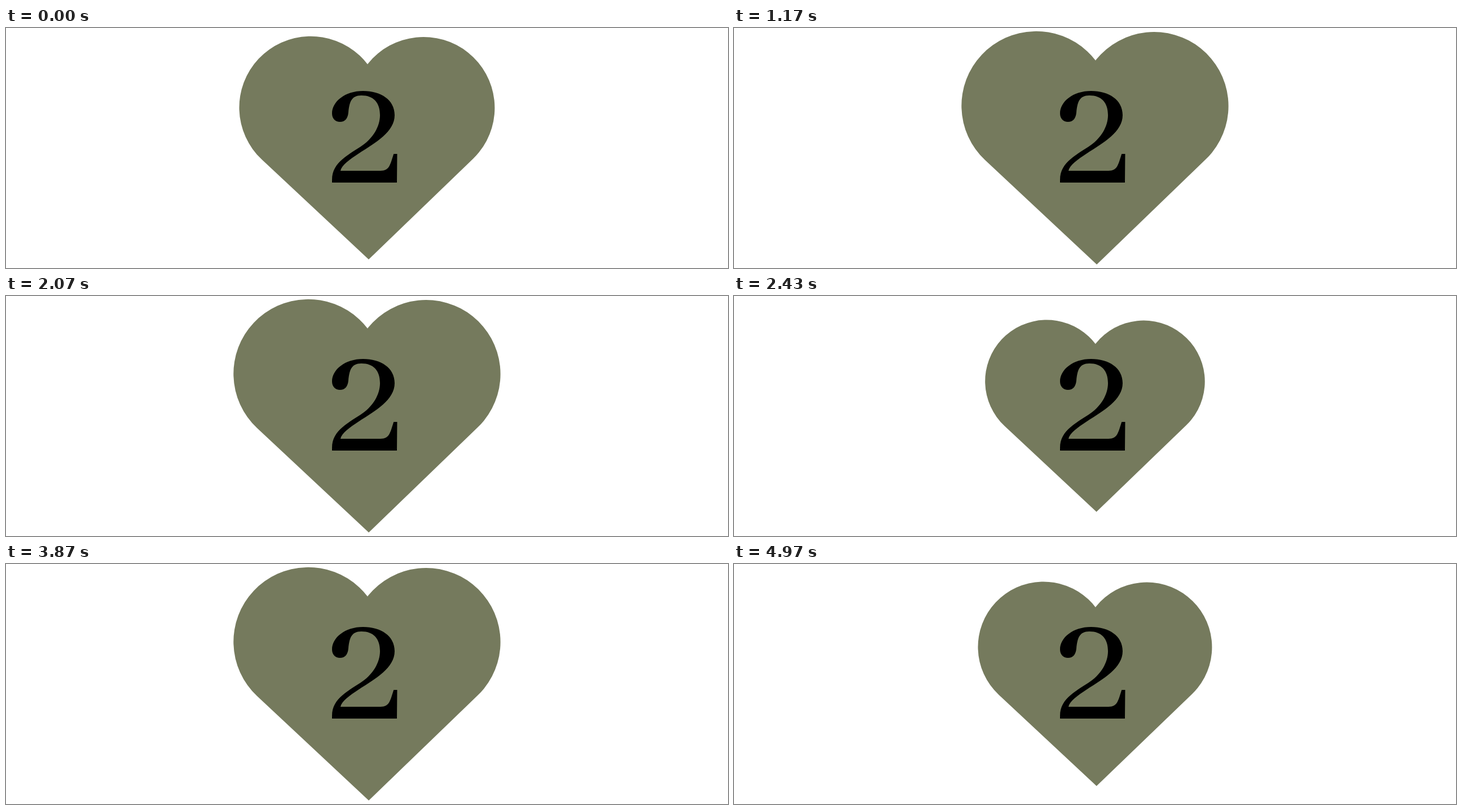
Animation, 1280 px wide and 427 px high, one loop 5010 ms. Source, as an HTML page with a canvas:

```html
<!DOCTYPE html>
<html lang="en">
<head>
<meta charset="utf-8">
<title>Beating heart</title>
<style>
  html, body { margin: 0; width: 100%; height: 100%; overflow: hidden; background: #fff; }
  canvas { display: block; width: 100vw; height: 100vh; }
</style>
</head>
<body>
<canvas id="stage" width="1280" height="427" role="img" aria-label="2">2</canvas>
<script>
const ctx = document.getElementById('stage').getContext('2d');
const LOOP = 5010, FRAMES = 150;
const CENTER = { x: 640, y: 213.5 };

// Beat, counted in frames: linear swell, then a slower quadratic ease-out.
const BEAT = 27, PEAK = 4.5, FALL = 18;
const BASE = 454, SMALL = 384.8, LARGE = 522;

function heartPath() {
  const tip = { x: 643, y: 412 };
  const left = { x: 540.2, y: 141.5, r: 127 };
  const right = { x: 740.4, y: 142, r: 126.3 };
  // Angle on a lobe where the straight side meets it.
  const touch = (lobe, side) => {
    const dx = tip.x - lobe.x, dy = tip.y - lobe.y;
    return Math.atan2(dy, dx) + side * Math.acos(lobe.r / Math.hypot(dx, dy));
  };
  const toCleft = lobe => Math.atan2(63 - lobe.y, 642.5 - lobe.x);
  const path = new Path2D();
  path.moveTo(tip.x, tip.y);
  path.arc(left.x, left.y, left.r, touch(left, 1), toCleft(left));
  path.arc(right.x, right.y, right.r, toCleft(right), touch(right, -1));
  path.closePath();
  return path;
}

const heart = heartPath();
const digit = new Path2D(`M578 275 L693 275 L693.5 224 L687.3 224
  C681 243 680 254 664 254 L593 254
  C595 244 609 234 625 223.5 C655 204 689 185 689 155
  C689 128 665 112 633 112 C601 112 578 131 578 152
  C578 161 584 167 592 167 C601 167 606 161 607 150
  C609 132 612 120 630 120 C652 120 663 133 663 155
  C663 176 650 196 633 208 C609 225 578 238 578 270 Z`);

function frameAt(ms) {
  const t = Math.floor((ms % LOOP) / 10) * 10;
  return Math.min(FRAMES - 1, Math.floor((t + 3.4) * 3 / 100));
}

function widthAt(frame) {
  const p = (frame - PEAK + BEAT) % BEAT;
  const k = p < FALL ? (1 - p / FALL) ** 2 : (p - FALL) / (BEAT - FALL);
  return SMALL + (LARGE - SMALL) * k;
}

function draw(ms) {
  const scale = widthAt(frameAt(ms)) / BASE;
  ctx.fillStyle = '#fff';
  ctx.fillRect(0, 0, 1280, 427);

  ctx.save();
  ctx.translate(CENTER.x, CENTER.y);
  ctx.scale(scale, scale);
  ctx.translate(-CENTER.x, -CENTER.y);
  ctx.fillStyle = '#757a5d';
  ctx.fill(heart);
  ctx.restore();

  ctx.fillStyle = '#000';
  ctx.fill(digit);
}

const start = performance.now();
function tick() {
  draw(performance.now() - start);
  requestAnimationFrame(tick);
}
tick();
</script>
</body>
</html>
```
